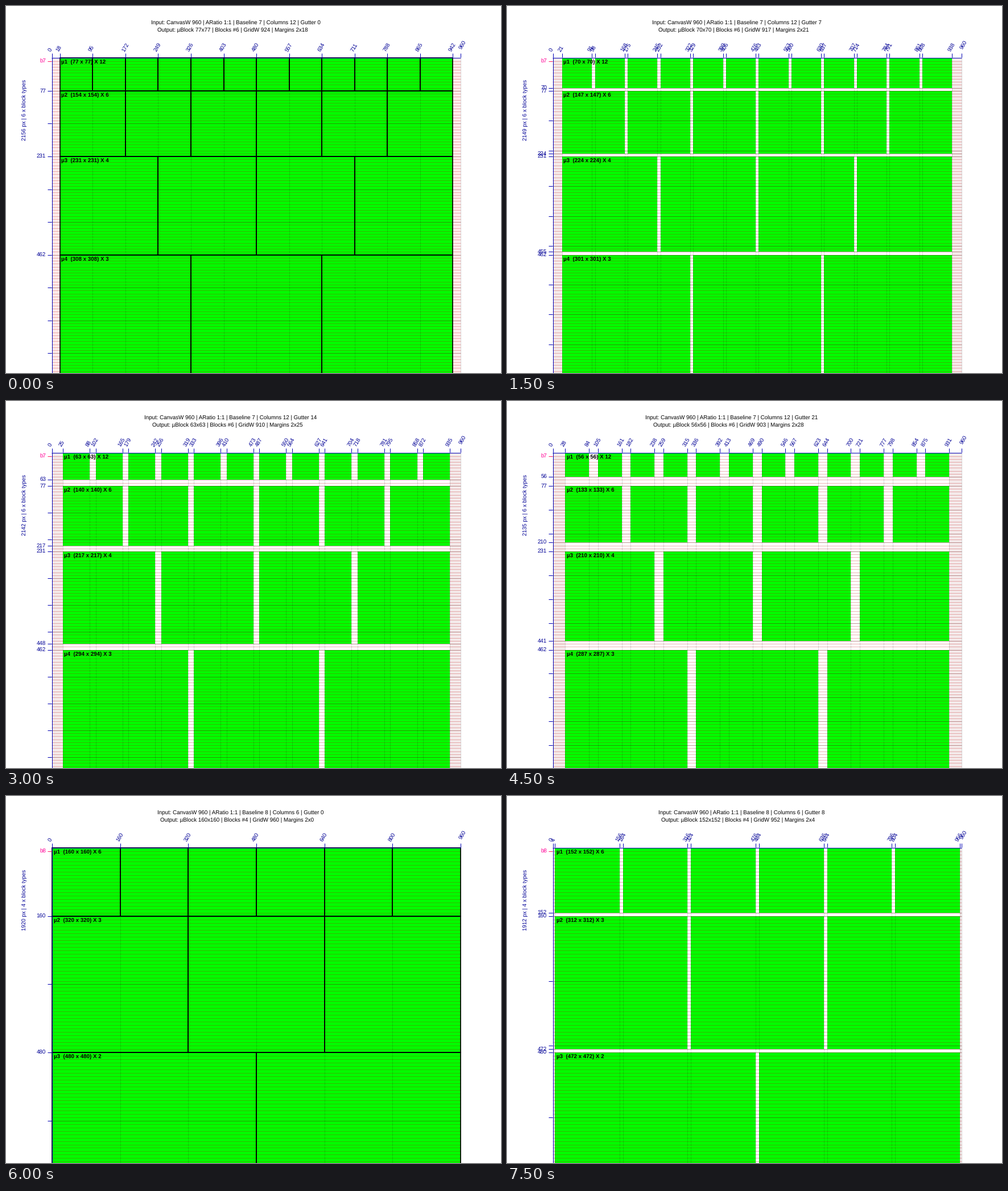
A matplotlib script that plays this animation: 870 by 644 pixels, repeating every 8000 ms.

```python
import matplotlib.pyplot as plt
from matplotlib.animation import FuncAnimation
from matplotlib.collections import LineCollection
from matplotlib.patches import Rectangle
from math import floor

W, H, DPI = 870, 644, 64
PX = 72 / DPI                     # points per pixel
CANVAS = 960
X0, Y0, SCALE = 80.8, 90.82, 0.7474
FONT = 9.7 * PX
NAVY, BLUE = "#000096", "#0000b4"
GREEN = "#00ff00"

# baseline, columns, gutter, left edge of each heading line
GRIDS = [
    (7, 12, 0, 254.8, 265.5),
    (7, 12, 7, 254.8, 265.5),
    (7, 12, 14, 243.2, 256.7),
    (7, 12, 21, 243.2, 256.7),
    (8, 6, 0, 266.2, 271.0),
    (8, 6, 8, 266.2, 271.0),
]

plt.rcParams["font.family"] = "Liberation Sans"
plt.rcParams["text.hinting"] = "none"
fig = plt.figure(figsize=(W / DPI, H / DPI), dpi=DPI, facecolor="white")
ax = fig.add_axes([0, 0, 1, 1])


def col(v):
    return floor(X0 + v * SCALE)


def row(v):
    return floor(Y0 + v * SCALE)


def rect(x0, y0, x1, y1, **style):
    # areas begin on the pixel after their grid line
    ax.add_patch(Rectangle((x0 + 1, y0 + 1), x1 - x0, y1 - y0, **style))


def fill(x0, y0, x1, y1, color):
    rect(x0, y0, x1, y1, fc=color, lw=0, antialiased=False, zorder=1)


def lines(segments, color, alpha=1, z=2):
    ax.add_collection(LineCollection(segments, colors=color, alpha=alpha,
                                     linewidths=PX, zorder=z))


def label(x, y, text, color="black", **style):
    ax.text(x, y, text, color=color, fontsize=FONT, va="baseline",
            rotation_mode="anchor", zorder=6, **style)


def across(ys):
    return [[(col(0), y + 0.5), (col(CANVAS) + 1, y + 0.5)] for y in ys]


def draw_blocks(rows, margin, unit, gutter, columns):
    for n, top, size in rows:
        y0, y1 = row(top), row(top + size)
        if y0 >= H:
            break
        for k in range(columns // n):
            left = margin + k * n * unit
            x0, x1 = col(left), col(left + size)
            fill(x0, y0, x1, y1, GREEN)
            if gutter == 0:
                rect(x0, y0, x1, y1, fill=False, ec="black", lw=1.7 * PX,
                     zorder=3)


def draw_captions(rows, margin, columns):
    for i, (n, top, size) in enumerate(rows, 1):
        if row(top) < H:
            label(X0 + margin * SCALE + 3, row(top) + 11,
                  f"µ{i}  ({size} x {size}) X {columns // n}", weight="bold")


def draw(frame):
    base, columns, gutter, left1, left2 = GRIDS[frame // 3]
    unit = CANVAS // columns // base * base
    block = unit - gutter
    grid_w = unit * columns - gutter
    margin = (CANVAS - grid_w) // 2

    ax.clear()
    ax.set_axis_off()
    ax.set_xlim(0, W)
    ax.set_ylim(H, 0)

    rows, top = [], 0
    for n in range(1, columns + 1):
        if columns % n == 0:
            rows.append((n, top, n * unit - gutter))
            top += n * unit
    height = top - gutter

    # margins and blocks
    if margin:
        shade = "#f4eaea" if gutter else "#ffebeb"
        fill(col(0), row(0), col(margin), H, shade)
        fill(col(margin + grid_w), row(0), col(CANVAS), H, shade)
    draw_blocks(rows, margin, unit, gutter, columns)

    # tick positions
    xs = {0, CANVAS}
    for k in range(columns):
        xs |= {margin + k * unit, margin + k * unit + block}
    named, ys = set(), set()
    for n, top, size in rows:
        named |= {top, top + size}
        ys |= {top + k * block for k in range(n + 1)}
    ys = {y for y in ys | named if y > 0 and row(y) < H}
    named &= ys

    # grid lines
    count = int((H - Y0) / SCALE / base) + 1
    lines(across(row(k * base) for k in range(1, count + 1)),
          "#b80000", alpha=0.28)
    lines(across(row(y) for y in ys), "black", alpha=0.18)
    lines([[(col(x) + 0.5, row(0)), (col(x) + 0.5, H)] for x in xs],
          "black", alpha=0.15)

    # axes and ticks
    x_axis, y_axis = col(0), row(0)
    ticks = [[(col(x) + 0.5, y_axis - 7), (col(x) + 0.5, y_axis)] for x in xs]
    ticks += [[(x_axis - 7, row(y) + 0.5), (x_axis, row(y) + 0.5)] for y in ys]
    ticks += across([y_axis])
    ticks.append([(x_axis + 0.5, y_axis), (x_axis + 0.5, H)])
    lines(ticks, BLUE, z=4)
    b = row(base)
    lines([[(x_axis - 7, b + 0.5), (x_axis, b + 0.5)]], "#ff2060", z=4)

    # labels
    for x in xs:
        dx, y = (3.5, 76.5) if x == CANVAS else (-1.5, 80.5)
        label(X0 + x * SCALE + dx, y, str(x), NAVY, rotation=60)
    for y in named:
        label(70, row(y) + 4, str(y), NAVY, ha="right")
    label(70, b + 3, f"b{base}", "#ff0096", ha="right")
    label(35, 235.5, f"{height} px | {len(rows)} x block types", NAVY,
          rotation=90)
    draw_captions(rows, margin, columns)
    label(left1, 32, f"Input: CanvasW {CANVAS} | ARatio 1:1 | Baseline {base}"
                     f" | Columns {columns} | Gutter {gutter}")
    label(left2, 45, f"Output: µBlock {block}x{block} | Blocks #{len(rows)}"
                     f" | GridW {grid_w} | Margins 2x{margin}")
    return []


anim = FuncAnimation(fig, draw, frames=16, interval=500, repeat=True,
                     repeat_delay=0, init_func=lambda: draw(0), blit=False)
plt.show()
```
